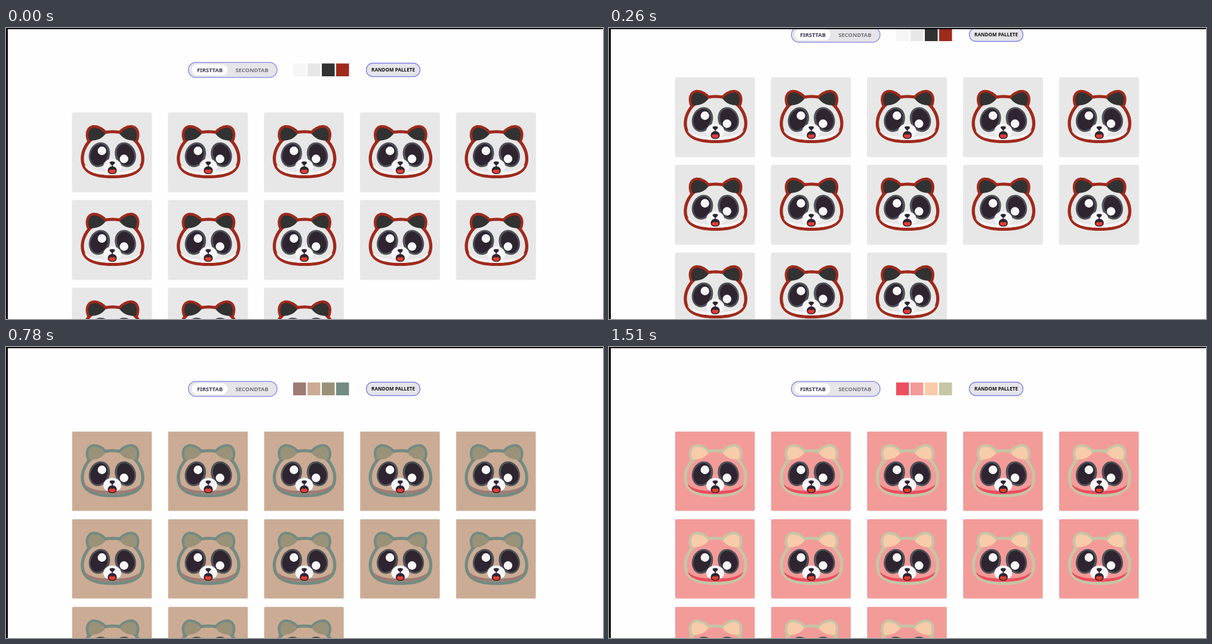
These frames come from a looping animation (1000x488 px, 1.82 s). An HTML page:

```html
<!DOCTYPE html>
<html lang="en">
<head>
<meta charset="utf-8">
<title>Palette picker</title>
<style>
  html, body { margin: 0; width: 100%; height: 100%; overflow: hidden; background: #fefefe; }
  svg { display: block; width: 1000px; height: 488px; animation: palette 1820ms step-end infinite; }
  #page { animation: scroll 1820ms step-end infinite; }
  text { font: 700 9.3px "Noto Sans", "Open Sans", sans-serif; text-anchor: middle; }
  .c1 { fill: var(--c1); }
  .c2 { fill: var(--c2); }
  .c3 { fill: var(--c3); }
  .c4 { fill: var(--c4); }
  .rim { fill: var(--c4); stroke: var(--c4); stroke-linejoin: round; }
  .edge { fill: var(--edge); }
  .pill { fill: #e4e4e9; stroke: #7f83e6; stroke-width: 1.3; }

  @keyframes palette {
    0%, 100% { --c1: #f5f5f5; --c2: #e7e7e7; --c3: #323232; --c4: #9f2a1c; --edge: #e7e8e7; }
    42.857%  { --c1: #9d7c75; --c2: #cbab94; --c3: #9a9278; --c4: #738b82; --edge: #eae3de; }
    57.143%  { --c1: #ec4f5f; --c2: #f39b98; --c3: #f8cba9; --c4: #c6c5a6; --edge: #f1dedd; }
  }
  @keyframes scroll {
    0%, 28.571%, 100% { transform: translateY(0); }
    14.286% { transform: translateY(-59px); }
  }
</style>
</head>
<body>
<svg viewBox="0 0 1000 488">
  <defs>
    <path id="ear" d="M28 44C25 34 28 26 36 25C43 25 51 29 55.5 36C51 41 45 46 36 46.5C32 47 29 48 28 44Z"/>
    <path id="head" d="M67.5 34.5C79 34.5 90 37 98 44C108 51 115.500 64 115.500 77C115.500 96 101 104.800 67.500 104.800C34 104.800 19.500 96 19.500 77C19.500 64 27 51 37 44C45 37 56 34.500 67.500 34.500Z"/>
    <g id="eye">
      <ellipse cx="45.500" cy="70.500" rx="17.300" ry="21.300" transform="rotate(20 45.500 70.500)" fill="#505359"/>
      <ellipse cx="45" cy="70.500" rx="14" ry="18.300" transform="rotate(20 45 70.500)" fill="#2e2531"/>
    </g>
    <g id="card">
      <rect class="edge" x="-.5" y="-.5" width="134" height="134" rx="3"/>
      <rect class="c2" width="133" height="132.500" rx="1.500"/>
      <use href="#ear" class="rim" stroke-width="8.500"/>
      <use href="#ear" class="rim" stroke-width="8.500" transform="matrix(-1 0 0 1 135 0)"/>
      <use href="#head" class="rim" stroke-width="10.600"/>
      <use href="#head" class="c2"/>
      <path class="c1" d="M20.500 88C31 98 48 99.500 67.500 99.500C87 99.500 104 98 114.500 88C110 100 94 104.800 67.500 104.800C41 104.800 25 100 20.500 88Z"/>
      <use href="#ear" class="c3"/>
      <use href="#ear" class="c3" transform="matrix(-1 0 0 1 135 0)"/>
      <use href="#eye"/>
      <use href="#eye" transform="matrix(-1 0 0 1 134.500 0)"/>
      <g fill="#f8f6f7">
        <circle cx="49.700" cy="64" r="7.200"/>
        <circle cx="86.700" cy="77.500" r="7.200"/>
        <path d="M67 77.500C75 77.500 82 83 82 90C82 97 76 100.500 67 100.500C58 100.500 52 97 52 90C52 83 59 77.500 67 77.500Z"/>
      </g>
      <g fill="#2e2531">
        <path d="M62.500 83.500C62.500 81 71.500 81 71.500 83.500C71.500 85.500 69 87 67.800 88V91H66.200V88C65 87 62.500 85.500 62.500 83.500Z"/>
        <path d="M67 90C71.500 90 74.500 93 74.500 97C74.500 101 71.500 103 67 103C62.500 103 59.500 101 59.500 97C59.500 93 62.500 90 67 90Z"/>
      </g>
      <path fill="#e23d30" d="M61.500 98C61.500 95 65 94.500 67 96C69 94.500 72.500 95 72.500 98C72.500 103 61.500 103 61.500 98Z"/>
    </g>
  </defs>

  <rect width="1000" height="488" fill="#fefefe"/>
  <g id="page">
    <rect class="pill" x="305.500" y="57.600" width="148.500" height="25.200" rx="12.600"/>
    <rect x="311" y="61" width="60" height="18.500" rx="9.200" fill="#fefefe"/>
    <text x="341.500" y="73.500" fill="#38364f">FIRSTTAB</text>
    <text x="412" y="73.500" fill="#72727c">SECONDTAB</text>
    <rect class="c1" x="481" y="59.500" width="21.500" height="21.500"/>
    <rect class="c2" x="505" y="59.500" width="21.500" height="21.500"/>
    <rect class="c3" x="529" y="59.500" width="21.500" height="21.500"/>
    <rect class="c4" x="553" y="59.500" width="21.500" height="21.500"/>
    <rect class="pill" x="603.500" y="59" width="90" height="22.500" rx="11.200"/>
    <text x="648.500" y="73" style="font-size:8.1px" fill="#111115">RANDOM PALLETE</text>
    <g id="cards"></g>
  </g>
  <path d="M0 0H1000V2H3V488H0Z"/>
</svg>
<script>
  const cards = document.getElementById('cards');
  for (let i = 0; i < 13; i++) {
    const card = document.createElementNS('http://www.w3.org/2000/svg', 'use');
    card.setAttribute('href', '#card');
    card.setAttribute('x', 111 + (i % 5) * 160.8);
    card.setAttribute('y', 142 + Math.floor(i / 5) * 147);
    cards.append(card);
  }
</script>
</body>
</html>
```
